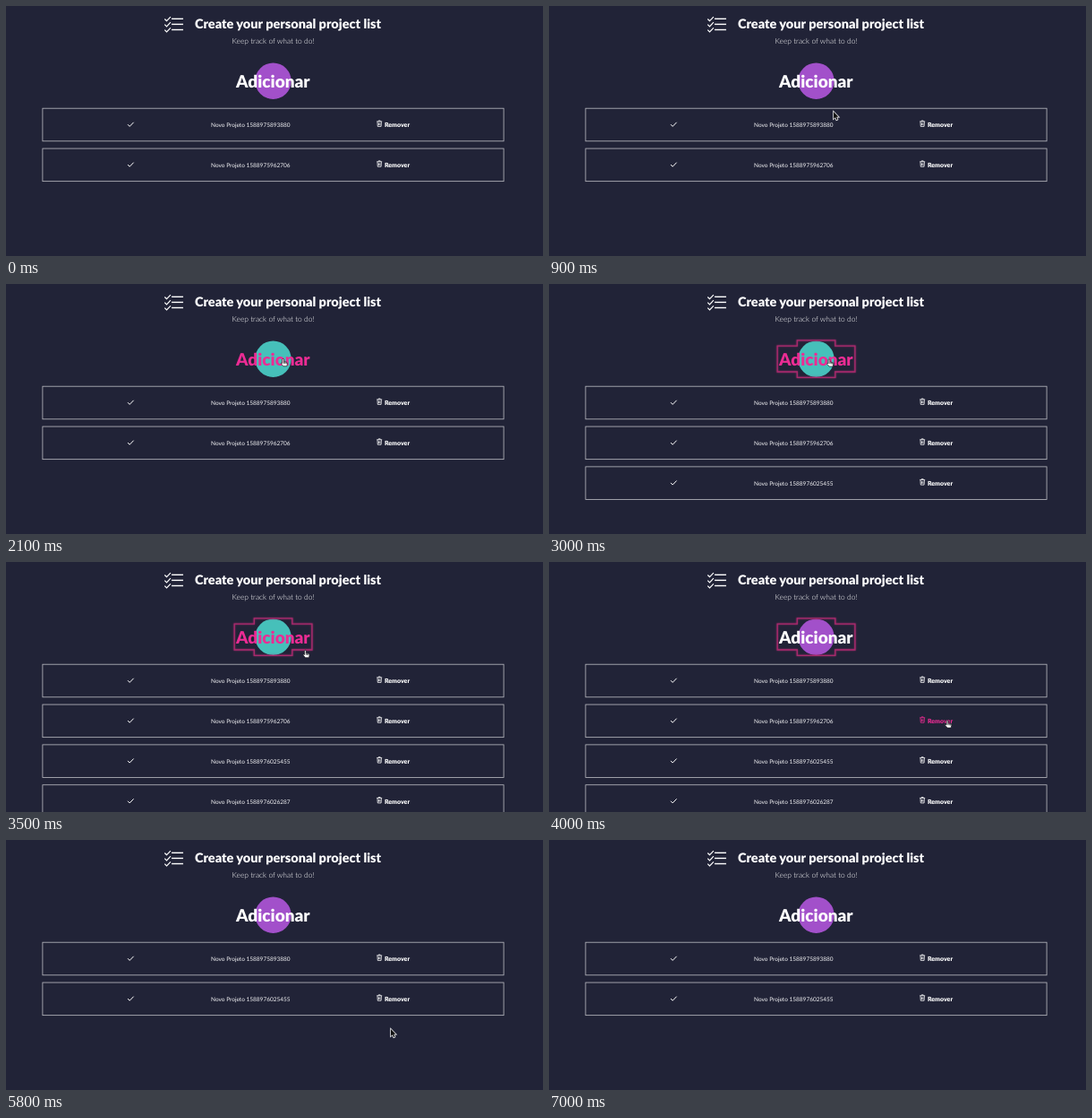
These frames come from a looping animation (600x279 px, 7200 ms). An HTML page with a canvas:

```html
<!DOCTYPE html>
<html lang="pt">
<head>
<meta charset="utf-8">
<title>Project list</title>
<style>
html, body { margin: 0; width: 100%; height: 100%; overflow: hidden; background: #212337; }
canvas { display: block; width: 600px; height: 279px; }
</style>
</head>
<body>
<canvas id="stage"></canvas>
<script>
const LOOP = 7200, STEP = 100, FADE = 300;
const WHITE = [255, 255, 255], PINK = [236, 44, 148];
const PURPLE = [162, 80, 202], TEAL = [70, 192, 186];

const canvas = document.getElementById('stage');
const ctx = canvas.getContext('2d');
const ratio = window.devicePixelRatio || 1;
canvas.width = 600 * ratio;
canvas.height = 279 * ratio;

// label, time added, time removed
const projects = [
  ['Novo Projeto 1588975893880', 0, LOOP],
  ['Novo Projeto 1588975962706', 0, 4300],
  ['Novo Projeto 1588976025455', 2200, LOOP],
  ['Novo Projeto 1588976026287', 3100, 5300]
];

// time, x, y of the pointer tip
const pointerPath = [
  [100, 424, 262], [500, 352, 170], [800, 318, 118], [900, 318, 118],
  [1300, 303, 108], [1400, 303, 108], [1500, 303, 90], [1600, 303, 82],
  [2200, 311, 84], [3000, 313, 84], [3300, 313, 84], [3600, 345, 106],
  [3900, 441, 172], [4000, 445, 177], [4500, 445, 177], [4800, 445, 215],
  [5000, 445, 219], [5500, 445, 219], [5800, 430, 211], [6200, 420, 216]
];

const hand = new Path2D('M-1 5V.8a1 1 0 0 1 2 0V3.4L4.6 4.2Q5.8 4.6 5.6 6L4.8 9.4H.2L-2.8 6Q-3 4.4-1 5.6Z' +
  'M1 3.4V6M2.6 3.8V6.2M4.2 4.2V6.4');
const arrow = new Path2D('M0 0V8L1.9 6.3 3.2 9.2 4.5 8.6 3.2 5.8H5.6Z');
const outline = new Path2D('M255.2 69.2H277.3V62.9H319.8V69.2H341.9V98H319.8V104.3H277.3V98H255.2Z');
const check = new Path2D('M0 2.6L2.2 4.8L6.6.2');
const bin = new Path2D('M0 1.2H6M2 1.1V.3H4V1.1M.8 1.5L1.1 6.7H4.9L5.2 1.5M2.3 2.8V5.4M3.7 2.8V5.4');

const clamp = v => Math.min(1, Math.max(0, v));
const within = (t, from, to) => t >= from && t < to;
const fade = (t, on, off) => clamp((t - on) / FADE) - clamp((t - off) / FADE);
const mix = (a, b, k) => `rgb(${a.map((v, i) => Math.round(v + (b[i] - v) * k))})`;

function text(str, x, y, size, weight, color) {
  ctx.font = `${weight} ${size}px Lato, sans-serif`;
  ctx.textAlign = 'center';
  ctx.fillStyle = color;
  ctx.fillText(str, x, y);
}

function line(path, x, y, color, width) {
  ctx.save();
  ctx.translate(x, y);
  ctx.strokeStyle = color;
  ctx.lineWidth = width;
  ctx.stroke(path);
  ctx.restore();
}

function drawHeader() {
  const bar = new Path2D('M0 0H13');
  for (let i = 0; i < 3; i++) {
    const y = 14.3 + i * 6.1;
    line(check, 177.3, y - 2.4, '#fff', 1.2);
    line(bar, 185, y, '#fff', 1.4);
  }
  text('Create your personal project list', 315, 24.8, 14.5, 900, '#fff');
  text('Keep track of what to do!', 298.5, 42.2, 8.45, 300, '#fff');
}

function drawButton(t) {
  ctx.fillStyle = mix(PURPLE, TEAL, fade(t, 1500, 3600));
  ctx.beginPath();
  ctx.arc(298.5, 83.7, 20.2, 0, 7);
  ctx.fill();
  const color = within(t, 1500, 3600) ? PINK : WHITE;
  text('Adicionar', 298.3, 90.8, 19, 900, `rgb(${color})`);
  if (within(t, 2200, 4300)) {
    ctx.save();
    ctx.shadowColor = '#a82c70';
    ctx.shadowBlur = 2 * ratio;
    line(outline, 0, 0, '#a82a6c', 1.3);
    ctx.restore();
  }
}

function drawRow(label, i, t) {
  const y = 114.2 + i * 44.85;
  ctx.strokeStyle = 'rgba(255,255,255,.7)';
  ctx.lineWidth = .8;
  ctx.strokeRect(40.9, y, 515.2, 36.6);

  const hover = i === 1 ? fade(t, 3700, 4500) : i === 2 ? fade(t, 4800, 5300) : 0;
  const color = mix(WHITE, PINK, hover);
  line(check, 136, y + 15.4, '#fff', 1);
  text(label, 273.3, y + 20.8, 6.5, 400, '#f4f4f6');
  line(bin, 414.2, y + 13.5, color, .8);
  text('Remover', 437, y + 20.9, 7, 900, color);
}

function drawPointer(t) {
  if (!within(t, 100, 6300)) return;
  let i = pointerPath.findIndex(p => p[0] > t);
  if (i < 0) i = pointerPath.length - 1;
  const [t0, x0, y0] = pointerPath[i - 1], [t1, x1, y1] = pointerPath[i];
  const k = clamp((t - t0) / (t1 - t0));
  const link = within(t, 1500, 3600) || within(t, 3800, 4600) || within(t, 4800, 5300);
  ctx.save();
  ctx.translate(x0 + (x1 - x0) * k, y0 + (y1 - y0) * k);
  if (link) {
    ctx.scale(.86, .86);
    ctx.fillStyle = '#fff';
    ctx.fill(hand);
    line(hand, 0, 0, '#16161c', .8);
  } else {
    line(arrow, 0, 0, '#fff', 1.4);
    ctx.fillStyle = '#111';
    ctx.fill(arrow);
  }
  ctx.restore();
}

function draw(now) {
  const t = Math.floor(now % LOOP / STEP) * STEP;
  ctx.setTransform(ratio, 0, 0, ratio, 0, 0);
  ctx.textRendering = 'geometricPrecision';
  ctx.fillStyle = '#212337';
  ctx.fillRect(0, 0, 600, 279);
  drawHeader();
  drawButton(t);
  projects
    .filter(([, from, to]) => within(t, from, to))
    .forEach(([label], i) => drawRow(label, i, t));
  drawPointer(t);
}

const start = performance.now();
function tick() {
  draw(performance.now() - start);
  requestAnimationFrame(tick);
}
tick();
</script>
</body>
</html>
```
